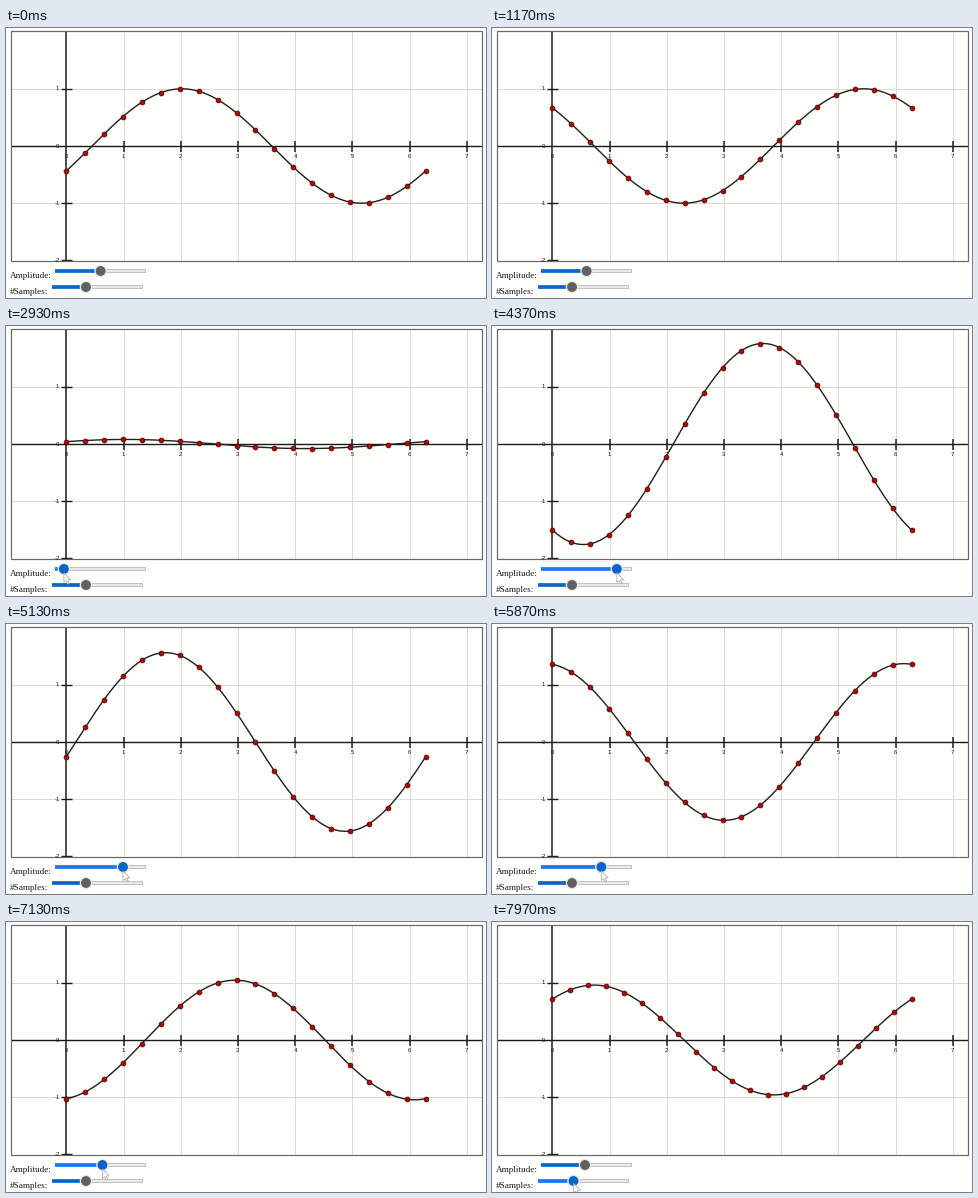
Write a matplotlib script that moves like this. It is 480 px wide and 270 px high and loops after 8000 ms.

```python
import numpy as np
import matplotlib.pyplot as plt
from matplotlib.animation import FuncAnimation
from matplotlib.patches import Circle, Polygon, Rectangle

W, H, DPI = 480, 270, 80
PX = 72 / DPI              # one pixel in points
LOOP, STEP = 8000, 32
X0, Y0, UNIT = 60.3, 118, 57.2

PAPER, INK, GRID = "#fefefc", "#1a1a1a", "#dcdcd4"
TRACK, HOT_TRACK = "#0a66cc", "#1a78fa"
KNOB, HOT_KNOB = "#606064", "#0a62cc"

# Drag of the amplitude slider: (time, amplitude)
DRAG = [(1500, 1), (2900, 0.08), (3200, 0.08), (4370, 1.76), (7450, 0.96)]
GRAB, RELEASE, REGRAB = 1500, 7450, 7650


def ramp(t, start, end):
    """Smooth step from 0 to 1 between two times."""
    u = np.clip((t - start) / (end - start), 0, 1)
    return u * u * (3 - 2 * u)


fig = plt.figure(figsize=(W / DPI, H / DPI), dpi=DPI, facecolor=PAPER)
ax = fig.add_axes([0, 0, 1, 1])
ax.set(xlim=(0, W), ylim=(H, 0))
ax.axis("off")


def line(x, y, color, width, **kw):
    return ax.plot(x, y, color=color, lw=width * PX,
                   solid_capstyle="butt", **kw)[0]


def label(x, y, s, size, **kw):
    return ax.text(x, y, s, fontsize=size * PX, color=INK, **kw)


plot_box = Rectangle((4.5, 3), 471.5, 230, fc="none", ec="#686868",
                     lw=1.2 * PX, zorder=3)
ax.add_patch(plot_box)


def draw_axes():
    small = dict(family="Liberation Sans", ha="center", va="center")
    for n in range(8):
        x = X0 + n * UNIT
        if n:
            line([x, x], [3, 233], GRID, 1)
            line([x, x], [113, 123.5], INK, 1.5)
        label(x, 128.4, str(n), 6, **small)
    for n in (1, 0, -1, -2):
        y = Y0 - n * UNIT
        if abs(n) == 1:
            line([5, 476], [y, y], GRID, 1)
        if n:
            line([55, 66], [y, y], INK, 1.4)
        label(51, y, str(n), 6, **small).set_clip_path(plot_box)
    line([5, 476], [Y0, Y0], INK, 1.4)
    line([X0, X0], [3, 233], INK, 1.5)


class Slider:
    def __init__(self, x, y, text, baseline):
        self.x, self.y = x, y
        label(4, baseline, text, 9.2, family="Liberation Serif")
        line([x, x + 91], [y, y], "#c2c2c2", 4, zorder=4)
        line([x + 1, x + 90], [y, y], "#e9e9ea", 2, zorder=4)
        self.fill = line([], [], TRACK, 3.6, zorder=5)
        self.knob = Circle((x, y), 5.6, ec="#ececdc", lw=1.3 * PX, zorder=6)
        ax.add_patch(self.knob)

    def set(self, pos, hot):
        self.fill.set_data([self.x, pos], [self.y, self.y])
        self.fill.set_color(HOT_TRACK if hot else TRACK)
        self.knob.center = pos, self.y
        self.knob.set_facecolor(HOT_KNOB if hot else KNOB)


draw_axes()
amp_slider = Slider(49, 243, "Amplitude:", 249.7)
count_slider = Slider(45.5, 259, "#Samples:", 265.7)

curve = line([], [], "#20201c", 1.4, zorder=4)
dots = ax.plot([], [], "o", ms=4.8 * PX, mfc="#b00808", mec="#4c0804",
               mew=0.8 * PX, zorder=5)[0]

ARROW = np.array([(0, 0), (0, 9.5), (2.2, 7.6), (3.8, 11), (5.3, 10.3),
                  (3.8, 7), (6.8, 6.8)])
cursor = Polygon(ARROW, closed=True, fc="#fffffa", ec="#b4b4a8",
                 lw=0.9 * PX, zorder=9)
ax.add_patch(cursor)

xs = np.linspace(0, 2 * np.pi, 160)


def update(frame):
    t = (frame + 0.5) * STEP
    sec = t / 1000
    amp = np.interp(t, *zip(*DRAG))
    phase = -0.49 + (2.478 + 0.0062 * sec) * sec
    extra = ramp(t, 7750, 7900)          # one more sample at the end

    def wave(x):
        return X0 + UNIT * x, Y0 - UNIT * amp * np.sin(x + phase)

    curve.set_data(*wave(xs))
    dots.set_data(*wave(np.linspace(0, 2 * np.pi, 20 + round(extra))))

    amp_x, count_x = 54.7 + 39.9 * amp, 80 + 1.5 * extra
    amp_slider.set(amp_x, GRAB <= t < RELEASE)
    count_slider.set(count_x, t >= REGRAB)

    # The pointer rises to the first slider, then moves down to the second.
    move = ramp(t, RELEASE, REGRAB)
    tip_x = amp_x + (count_x - amp_x) * move
    tip_y = 272 - 25 * ramp(t, 1250, GRAB) + 14.5 * move
    cursor.set_xy(ARROW + (tip_x, tip_y))
    return curve, dots, cursor


anim = FuncAnimation(fig, update, frames=LOOP // STEP, interval=STEP,
                     repeat=True, repeat_delay=0)
plt.show()
```
